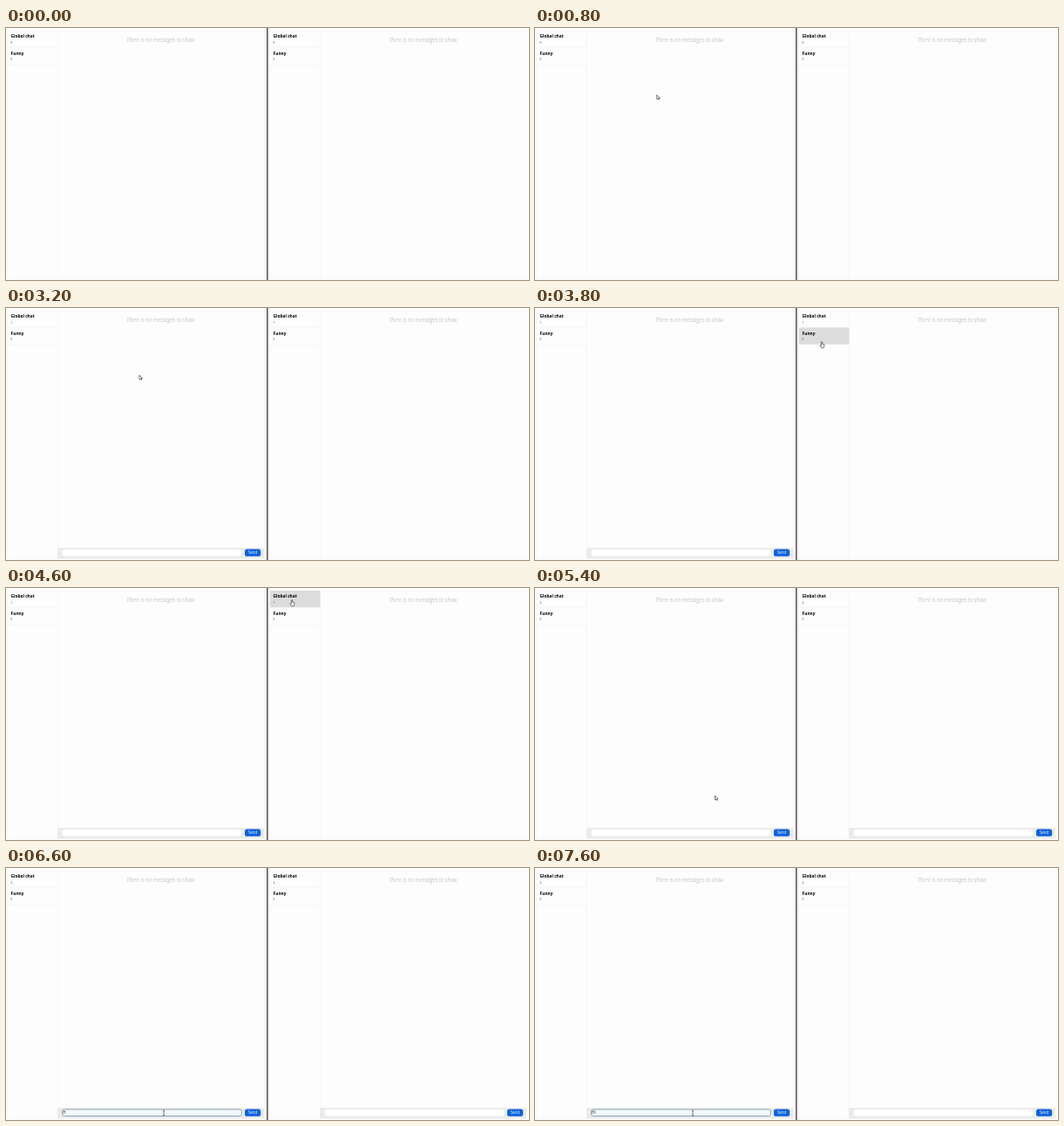
Write an HTML page that moves like this. It is 600 px wide and 289 px high and loops after 8 s.

```html
<!DOCTYPE html>
<html lang="en">
<head>
<meta charset="utf-8">
<title>Two chat windows</title>
<style>
  html, body { margin: 0; width: 100%; height: 100%; overflow: hidden; background: #fdfdfd; }
  svg { display: block; width: 100vw; height: 100vh; }
  text { font-family: "Open Sans", "Noto Sans", sans-serif; fill: #111; }
  .name { font-size: 4.8px; font-weight: 700; fill: #000; }
  .count { font-size: 3.1px; fill: #333; }
  .empty { font-size: 6.35px; font-weight: 300; font-style: italic; fill: #a8a8a8; }
  .send { font-size: 4.4px; fill: #fff; text-anchor: middle; }
  .typed { font-size: 4.4px; }
  .line { fill: none; stroke: #f5f5f5; stroke-width: .8; }
</style>
</head>
<body>
<svg id="stage" viewBox="0 0 600 289" preserveAspectRatio="none"></svg>
<script>
const LOOP = 8000, STEP = 200;
const LEFT = 0, RIGHT = 301, ROW_TOP = 3, ROW_H = 19.5;
const stage = document.getElementById('stage');
const $ = id => document.getElementById(id);

const row = (id, i, name) => `
  <g transform="translate(0 ${ROW_TOP + i * ROW_H})">
    <rect id="${id}Row${i}" x="2" width="57.5" height="${ROW_H}" fill="#dcdcdc"/>
    <path class="line" d="M2 19.4H59"/>
    <text class="name" x="5.6" y="8.4">${name}</text>
    <text class="count" id="${id}Count${i}" x="5.4" y="14.7">0</text>
  </g>`;

const pane = (id, x) => `
  <g transform="translate(${x})">
    <path class="line" d="M297 3.5H1.5V287.5H297M59.5 3.5V287"/>
    ${row(id, 0, 'Global chat')}${row(id, 1, 'Funny')}
    <text class="empty" x="138" y="16.2">There is no messages to show</text>
    <g id="${id}Bar">
      <rect x="59" y="275" width="237" height="12" fill="#ebebeb"/>
      <rect id="${id}Input" x="64.6" y="276.9" width="205.8" height="7.6" rx="2.6" fill="#fff" stroke="#f4f4f4" stroke-width=".6"/>
      <rect x="274" y="276.5" width="18.2" height="8.3" rx="2.6" fill="#0d62dc"/>
      <text class="send" x="283.1" y="282.2">Send</text>
    </g>
  </g>`;

stage.innerHTML = `
  <rect width="600" height="289" fill="#fdfdfd"/>
  <rect x="296" width="3" height="289" fill="#f6f6f6"/>
  <rect x="300" width="3" height="289" fill="#f3f3f3"/>
  ${pane('l', LEFT)}${pane('r', RIGHT)}
  <rect x="299" width="1.5" height="289" fill="#555"/>
  <text class="typed" id="typed" x="65.3" y="282.2"></text>
  <path id="caret" d="M0 278.4V283.2" stroke="#111" stroke-width=".5"/>
  <g id="pointer" fill="#fff" stroke="#222" stroke-width=".6" stroke-linejoin="round">
    <path id="arrow" d="M0 0V5L1.2 4L2 5.6L2.8 5.2L2.1 3.7H3.5Z"/>
    <path id="hand" d="M-.6 .4Q0-.4.6.4V2.6L2.8 3.2V5.4L2.1 7.2H-.5L-2.2 4.6Q-1.8 3.6-.6 4.6Z"/>
    <path id="beam" fill="none" d="M-1-2.8H1M0-2.8V2.8M-1 2.8H1"/>
  </g>`;

// Pointer stops: ms, x, y
const stops = [
  [200, 316, 194], [1200, 44, 13], [3000, 44, 13], [3200, 153, 77], [3800, 329, 38.5],
  [4200, 328, 13.5], [4800, 328, 13.5], [5600, 184, 279.6], [6400, 181, 281]
];
const JOIN_LEFT = 2400, JOIN_RIGHT = 4800, FOCUS = 5800, TYPE = 6600, KEY_GAP = 400;

const ease = p => p * p * (3 - 2 * p);
const show = (id, on) => $(id).setAttribute('visibility', on ? 'visible' : 'hidden');

function pointerAt(t) {
  const i = stops.findLastIndex(s => s[0] <= t);
  if (i < 0) return [-20, -20];
  const [t0, x0, y0] = stops[i];
  const [t1, x1, y1] = stops[i + 1] || [LOOP, x0, y0];
  const p = ease((t - t0) / (t1 - t0));
  return [x0 + (x1 - x0) * p, y0 + (y1 - y0) * p];
}

function drawPointer(t) {
  const [x, y] = pointerAt(t);
  const hovered = Math.floor((y - ROW_TOP) / ROW_H);
  let overRow = false;
  for (const [id, left] of [['l', LEFT], ['r', RIGHT]])
    for (const i of [0, 1]) {
      const over = i === hovered && x > left + 2 && x < left + 59;
      show(id + 'Row' + i, over);
      overRow ||= over;
    }
  const overInput = y > 276;
  show('hand', overRow);
  show('beam', overInput);
  show('arrow', !overRow && !overInput);
  $('pointer').setAttribute('transform', `translate(${x} ${y})`);
}

function drawInput(t) {
  const focused = t >= FOCUS, tinted = t > FOCUS;
  $('lInput').setAttribute('stroke', tinted ? '#4b7391' : focused ? '#555' : '#f4f4f4');
  $('lInput').setAttribute('fill', tinted ? '#f1fafd' : '#fff');

  const keys = Math.max(0, Math.floor((t - TYPE) / KEY_GAP) + 1);
  const typed = $('typed');
  typed.textContent = 'Hi'.slice(0, keys);
  show('caret', focused && (t - FOCUS) % 1000 < 500);
  $('caret').setAttribute('transform', `translate(${65.6 + typed.getComputedTextLength()})`);
}

function draw(time) {
  const t = Math.floor(time % LOOP / STEP) * STEP;
  const members = (t >= JOIN_LEFT) + (t >= JOIN_RIGHT);
  show('lBar', t >= JOIN_LEFT);
  show('rBar', t >= JOIN_RIGHT);
  for (const id of ['l', 'r']) $(id + 'Count0').textContent = members;
  drawPointer(t);
  drawInput(t);
}

const start = performance.now();
function tick() {
  draw(performance.now() - start);
  requestAnimationFrame(tick);
}
tick();
</script>
</body>
</html>
```
